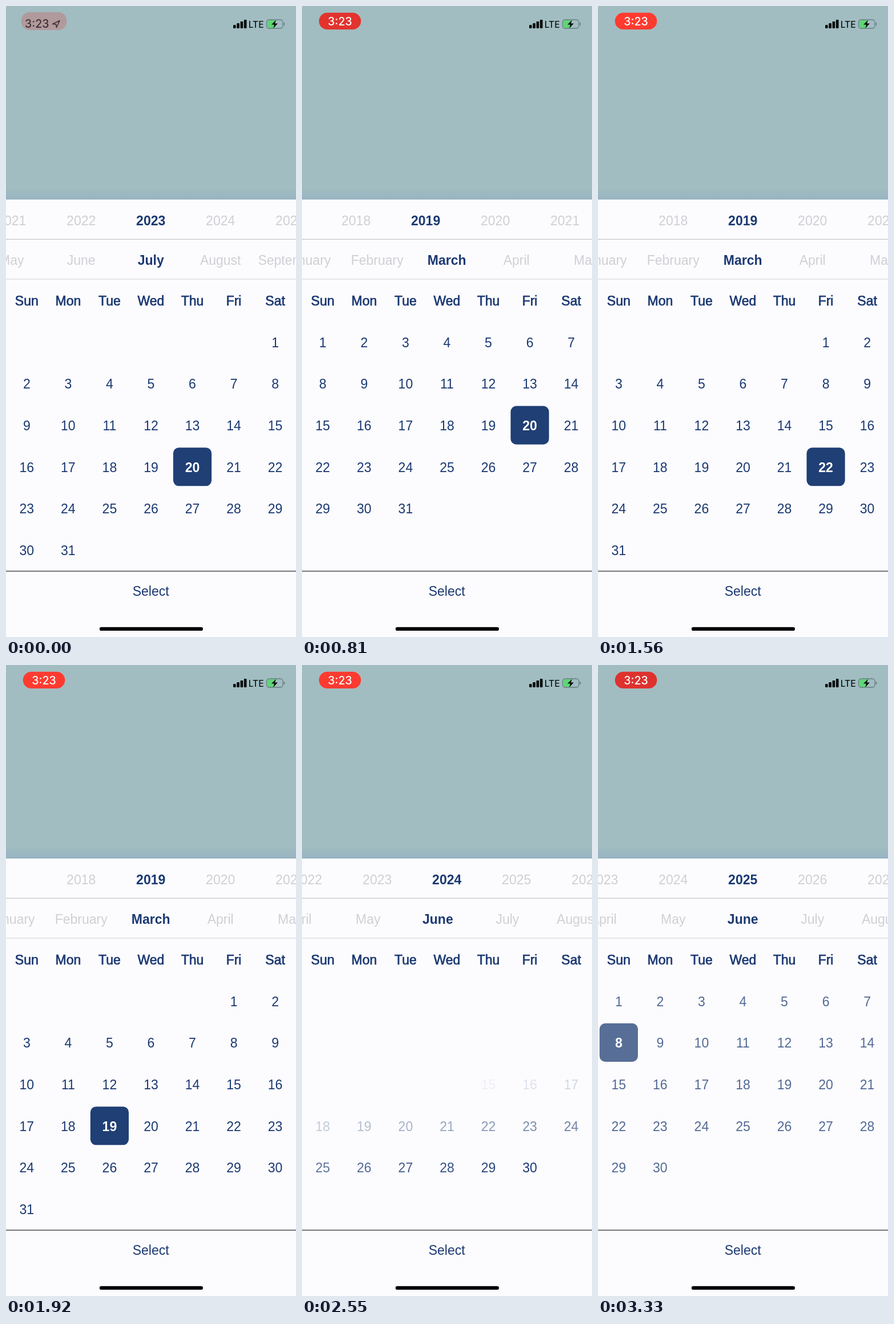
Animation of 508x1102 px, one loop 3.36 s. Source, as an HTML page with a canvas:

```html
<!DOCTYPE html>
<html lang="en">
<head>
<meta charset="utf-8">
<title>Date picker</title>
<style>
  html, body { margin: 0; width: 100%; height: 100%; overflow: hidden; background: #fcfcfe; }
  canvas { display: block; width: 508px; height: 1102px; }
</style>
</head>
<body>
<canvas id="stage"></canvas>
<script>
const W = 508, H = 1102, LOOP = 3360, STEP = 30;
const NAVY = '#1b3972', GREY = '#d0cfd5', SHEET = '#fcfcfe', INK = '#2a2024';
const SANS = '"Liberation Sans", Arial, sans-serif';
const UI = 'Inter, Roboto, sans-serif';
const MID = 253.7, GAP = 122;
const FADE = 80, STAGGER = 5, REACT = 80, TAP_FADE = 120;
const CLEAR = 31 * STAGGER + FADE;

const DAYS = ['Sun', 'Mon', 'Tue', 'Wed', 'Thu', 'Fri', 'Sat'];
const MONTHS = ['January', 'February', 'March', 'April', 'May', 'June', 'July',
  'August', 'September', 'October', 'November', 'December'];
const YEARS = Array.from({ length: 15 }, (_, i) => 2018 + i);

// The whole session: what is flicked to or tapped, and when
const START = { year: 2023, month: 7, day: 20 };
const ACTIONS = [
  { at: 115, month: 3 },
  { at: 395, year: 2020 },
  { at: 740, year: 2019 },
  { at: 1200, day: 22 },
  { at: 1600, day: 19 },
  { at: 1925, year: 2023 },
  { at: 1930, day: 8 },
  { at: 1990, month: 6.13 },
  { at: 2325, year: 2024 },
  { at: 2550, month: 6 },
  { at: 2955, year: 2025 },
];

const canvas = document.getElementById('stage');
const ctx = canvas.getContext('2d');
const dpr = window.devicePixelRatio || 1;
canvas.width = W * dpr;
canvas.height = H * dpr;

const clamp = v => Math.max(0, Math.min(1, v));
const mix = (a, b, p) => a + (b - a) * p;
const easeOut = p => 1 - (1 - p) ** 2;

// Longer flicks take longer to settle
function position(axis, t) {
  let value = START[axis], last = value;
  for (const action of ACTIONS) {
    if (!(axis in action) || t < action.at) continue;
    const target = action[axis];
    const time = 65 + 91 * Math.abs(target - last);
    value = mix(value, target, easeOut(clamp((t - action.at) / time)));
    last = target;
  }
  return value;
}

// A new month clears the old page cell by cell, then appears at once
function buildPages() {
  let page = { ...START, enter: -FADE, leave: Infinity };
  const pages = [page];
  for (const { at, year = page.year, month = page.month } of ACTIONS) {
    const next = { year, month: Math.round(month), leave: Infinity };
    if (next.year === page.year && next.month === page.month) continue;
    page.leave = at + REACT;
    next.enter = page.leave + CLEAR;
    pages.push(page = next);
  }
  return pages.filter(p => p.enter < p.leave);
}
const PAGES = buildPages();

function chosen(day, t) {
  let amount = day === START.day ? 1 : 0;
  for (const action of ACTIONS) {
    if (action.day && t >= action.at) {
      amount = mix(amount, action.day === day ? 1 : 0, clamp((t - action.at) / TAP_FADE));
    }
  }
  return amount;
}

function text(str, x, y, color, font, align = 'center') {
  ctx.font = font;
  ctx.textAlign = align;
  ctx.fillStyle = color;
  ctx.fillText(str, x, y);
}

function box(x, y, w, h, r, color) {
  ctx.beginPath();
  ctx.roundRect(x, y, w, h, r);
  ctx.fillStyle = color;
  ctx.fill();
}

function trace(points) {
  ctx.beginPath();
  points.forEach(([x, y]) => ctx.lineTo(x, y));
  ctx.closePath();
}

function faded(alpha, draw) {
  if (alpha <= 0) return;
  ctx.save();
  ctx.globalAlpha *= alpha;
  draw();
  ctx.restore();
}

function rule(y, h, color) {
  ctx.fillStyle = color;
  ctx.fillRect(0, y, W, h);
}

function backdrop() {
  rule(0, 338, '#a1bdc1');
  const shade = ctx.createLinearGradient(0, 318, 0, 338);
  shade.addColorStop(0, 'rgba(146,174,194,0)');
  shade.addColorStop(1, 'rgba(146,174,194,0.65)');
  rule(318, 20, shade);
  rule(338, H - 338, SHEET);
}

function clock(t) {
  const p = clamp(t / 90), grow = 1 - p;
  const glow = clamp(1.2 * Math.sin(Math.PI * clamp((t - 700) / 2600)));
  const red = `rgb(${mix(222, 255, glow)},${mix(50, 59, glow)},${mix(46, 48, glow)})`;
  const font = `500 19.5px ${UI}`;
  faded(mix(0.25, 1, p), () =>
    box(29.7 - 3 * grow, 11.8 - grow, 73.6 + 6 * grow, 29.2 + 2 * grow, 14.6, red));
  faded(grow * 0.85, () => {
    text('3:23', 33, 38, INK, font, 'left');
    trace([[81.5, 31.5], [94, 25.5], [88.5, 37.5], [87.5, 32]]);
    ctx.strokeStyle = INK;
    ctx.lineWidth = 1.6;
    ctx.lineJoin = 'round';
    ctx.stroke();
  });
  faded(p, () => text('3:23', 66.5, 33.5, '#fff', font));
}

function statusIcons() {
  for (let i = 0; i < 4; i++) {
    const h = 6 + 3 * i;
    box(398 + i * 6.3, 39 - h, 4.6, h, 1.2, '#050808');
  }
  text('LTE', 438.2, 37.5, '#101517', `500 15.6px ${UI}`);
  box(457.5, 25, 14, 13, [3, 0, 0, 3], '#5fd576');
  ctx.beginPath();
  ctx.roundRect(456.5, 24, 28.5, 15, 4.5);
  ctx.strokeStyle = '#687d80';
  ctx.lineWidth = 1.3;
  ctx.stroke();
  box(486.5, 29, 1.8, 5, 1, '#687d80');
  trace([[473, 24.5], [465, 32.5], [470, 32.5], [468, 39], [476, 30.5], [471, 30.5]]);
  ctx.fillStyle = '#050808';
  ctx.fill();
}

function strip(labels, first, current, y) {
  const active = Math.round(current);
  labels.forEach((label, i) => {
    const x = MID + (i + first - current) * GAP;
    if (x < -80 || x > W + 80) return;
    const on = i + first === active;
    text(label, x, y, on ? NAVY : GREY, `${on ? 'bold ' : ''}23px ${SANS}`);
  });
}

const columnX = c => 36.3 + c * 72.55;
const rowY = r => 586.8 + r * 72.65;

function weekdays() {
  ctx.strokeStyle = NAVY;
  ctx.lineWidth = 0.7;
  DAYS.forEach((day, c) => {
    text(day, columnX(c), 523, NAVY, `23px ${SANS}`);
    ctx.strokeText(day, columnX(c), 523);
  });
}

function cell(day, x, y, alpha, on) {
  if (alpha <= 0) return;
  faded(alpha * on, () => box(x - 33.6, y - 33.6, 67.2, 67.2, 10, '#203f75'));
  faded(alpha * (1 - on), () => text(day, x, y + 9, NAVY, `23px ${SANS}`));
  faded(on, () => text(day, x, y + 9, '#fff', `bold 23px ${SANS}`));
}

function calendar(t) {
  for (const { year, month, enter, leave } of PAGES) {
    if (t < enter || t > leave + CLEAR) continue;
    const first = new Date(year, month - 1, 1).getDay();
    const count = new Date(year, month, 0).getDate();
    const shown = clamp((t - enter) / FADE);
    for (let i = 0; i < count; i++) {
      const left = 1 - clamp((t - leave - i * STAGGER) / FADE);
      const slot = first + i;
      cell(i + 1, columnX(slot % 7), rowY(Math.floor(slot / 7)), shown * left, chosen(i + 1, t));
    }
  }
}

function draw(t) {
  ctx.setTransform(dpr, 0, 0, dpr, 0, 0);
  backdrop();
  clock(t);
  statusIcons();
  strip(YEARS, YEARS[0], position('year', t), 382.5);
  rule(406.7, 1.3, '#c6c6ca');
  strip(MONTHS, 1, position('month', t), 452);
  rule(476.3, 1.3, '#dcdce0');
  weekdays();
  calendar(t);
  rule(986.3, 1.4, '#424347');
  text('Select', MID, 1030, NAVY, `23px ${SANS}`);
  box(163.8, 1084.8, 181.2, 6.2, 3.1, '#000');
}

const begin = performance.now();
function frame() {
  const t = (performance.now() - begin) % LOOP;
  draw(Math.floor(t / STEP) * STEP);
  requestAnimationFrame(frame);
}
frame();
</script>
</body>
</html>
```
